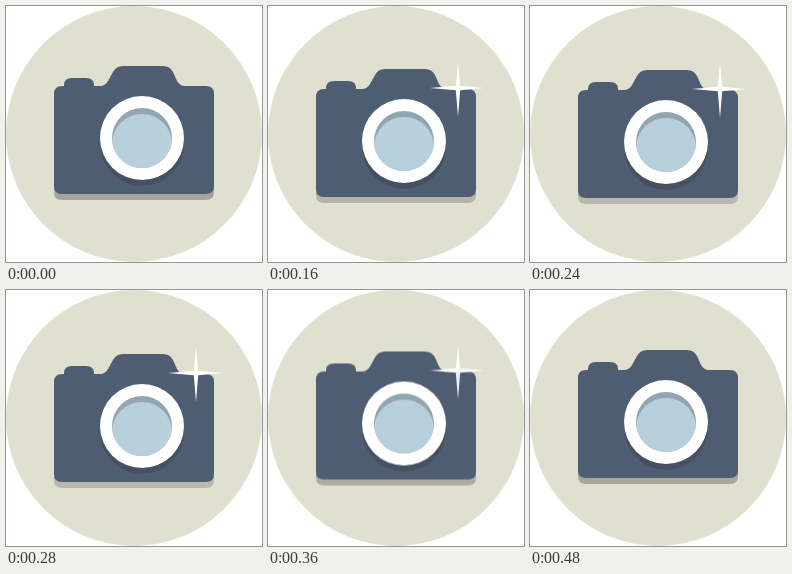
Animation of 256x256 px, one loop 1.16 s. Source, as an HTML page:

```html
<!DOCTYPE html>
<html lang="en">
<head>
<meta charset="utf-8">
<title>Camera flash</title>
<style>
  html, body { margin: 0; width: 100%; height: 100%; overflow: hidden; background: #fff; }
  svg { display: block; width: 100vw; height: 100vh; }
  .camera { animation: press 1160ms step-end infinite; }
  .spark { opacity: 0; animation: glint 1160ms step-end infinite; }
  .floor { animation: shade 1160ms step-end infinite; }

  /* 40 ms steps: 1 step = 3.448% */
  @keyframes press {
    0% { transform: translateY(0); }
    10.344% { transform: translateY(1.5px); }
    13.793% { transform: translateY(3px); }
    17.241% { transform: translateY(4px); }
    27.586% { transform: translateY(2.8px); }
    31.034% { transform: translateY(1.5px); }
    34.482% { transform: translateY(.5px); }
    37.931%, 100% { transform: translateY(0); }
  }
  @keyframes glint {
    0% { opacity: 0; }
    6.896% { opacity: 1; }
    31.034% { opacity: .9; }
    34.482% { opacity: .7; }
    37.931% { opacity: .35; }
    41.379%, 100% { opacity: 0; }
  }
  @keyframes shade {
    0% { opacity: .3; }
    10.344% { opacity: .27; }
    13.793% { opacity: .23; }
    17.241% { opacity: .2; }
    27.586% { opacity: .23; }
    31.034% { opacity: .27; }
    34.482%, 100% { opacity: .3; }
  }
</style>
</head>
<body>
<svg viewBox="0 0 256 256">
  <defs>
    <path id="body" d="M56 80H58V79Q58 72 66 72H80Q88 72 88 79V80H94Q99 80 102 75L107 66Q110 60 117 60H157Q164 60 167 66L171 75Q174 80 179 80H200Q208 80 208 88V180Q208 188 200 188H56Q48 188 48 180V88Q48 80 56 80Z"/>
    <clipPath id="glass"><circle cx="136" cy="132" r="30"/></clipPath>
  </defs>
  <circle cx="128" cy="128" r="128" fill="#e0e0d1"/>
  <g class="camera">
    <use class="floor" href="#body" y="6" fill="#231f20"/>
    <use href="#body" fill="#4f5d73"/>
    <circle cx="136" cy="138" r="42" fill="#231f20" opacity=".2"/>
    <circle cx="136" cy="132" r="42" fill="#fff"/>
    <g clip-path="url(#glass)">
      <circle cx="136" cy="132" r="31" fill="#93a6b0"/>
      <circle cx="136" cy="138" r="30" fill="#b8cfdc"/>
    </g>
    <path class="spark" fill="#fff" d="M190 53L192.2 76.8L216 79L192.2 81.2L190 108L187.8 81.2L162 79L187.8 76.8Z"/>
  </g>
</svg>
</body>
</html>
```
